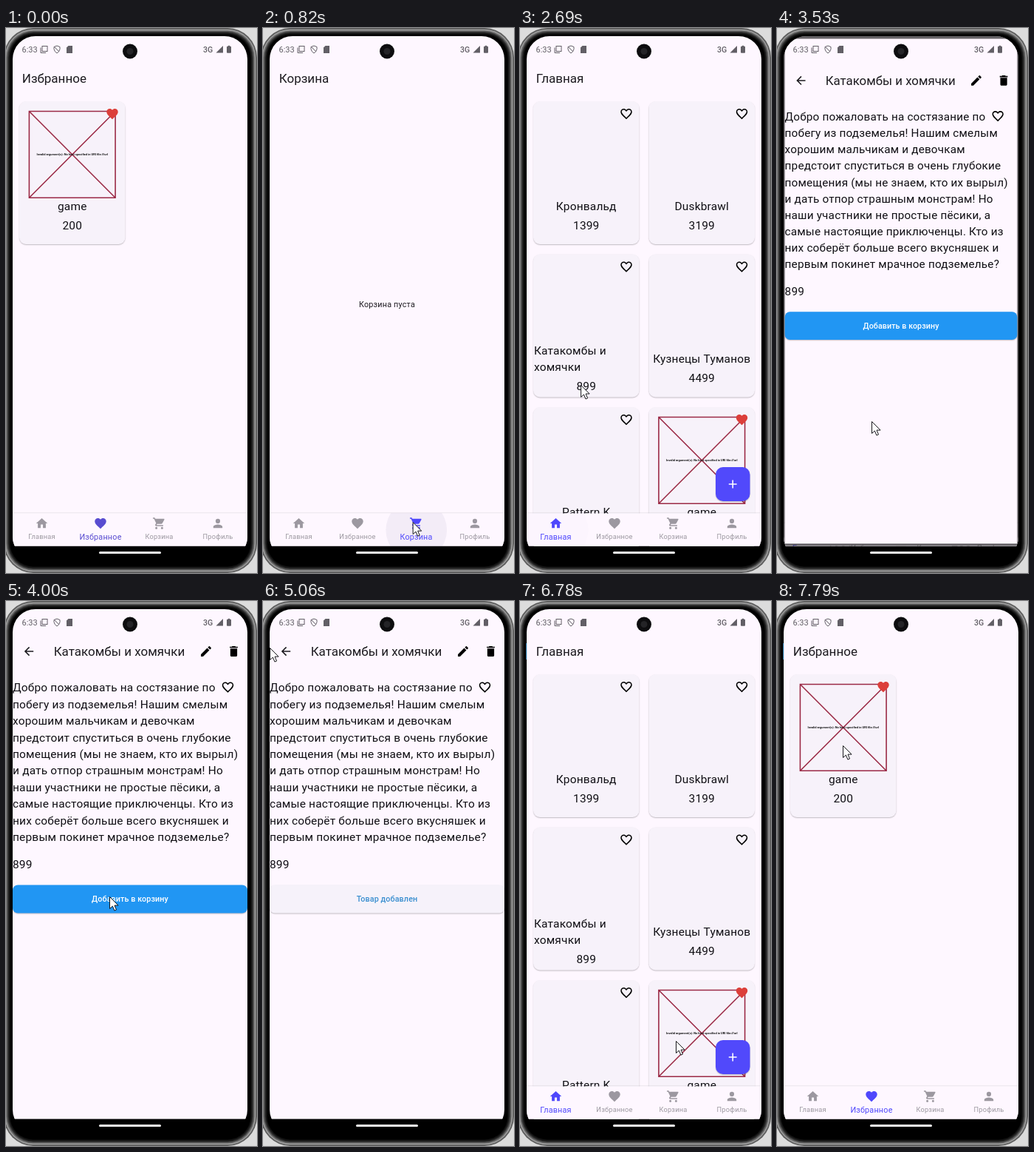
An HTML page with a canvas for the animation above (8000 ms loop, 340x736 px).

```html
<!DOCTYPE html>
<html lang="ru">
<head>
<meta charset="utf-8">
<title>Shop</title>
<style>
html, body { margin: 0; width: 100%; height: 100%; overflow: hidden; background: #000; }
canvas { display: block; width: 340px; height: 736px; }
</style>
</head>
<body>
<canvas id="stage"></canvas>
<script>
const LOOP = 8000;
const canvas = document.getElementById('stage');
const ratio = window.devicePixelRatio || 1;
canvas.width = 340 * ratio;
canvas.height = 736 * ratio;
const c = canvas.getContext('2d');

const BG = '#fef7ff', INK = '#1d1b20', CARD = '#f7f2fa', RED = '#dc3f3a', GREY = [156, 152, 160];
const CX = 168, CY = 364.5, PAGE_H = 688.7;

const HEART = new Path2D('M12 21.35l-1.45-1.32C5.4 15.36 2 12.28 2 8.5 2 5.42 4.42 3 7.5 3c1.74 0 3.41.81 4.5 2.09C13.09 3.81 14.76 3 16.5 3 19.58 3 22 5.42 22 8.5c0 3.78-3.4 6.86-8.55 11.54z');
const HOME = new Path2D('M10 20v-6h4v6h5v-8h3L12 3 2 12h3v8z');
const CART = new Path2D('M1 2v2h2l3.6 7.6-1.4 2.4c-.7 1.4.3 3 1.8 3h12v-2H7.4l1-1.9h7.2c.8 0 1.4-.4 1.8-1l3.6-6.5c.4-.7-.1-1.6-.9-1.6H5.2l-.9-2zM7 18a2 2 0 100 4 2 2 0 000-4zm10 0a2 2 0 100 4 2 2 0 000-4z');
const PERSON = new Path2D('M12 4a4 4 0 100 8 4 4 0 000-8zM12 14c-2.7 0-8 1.3-8 4v2h16v-2c0-2.7-5.3-4-8-4z');
const BACK = new Path2D('M20 11H7.83l5.59-5.59L12 4l-8 8 8 8 1.41-1.41L7.83 13H20z');
const EDIT = new Path2D('M3 17.2V21h3.8L17.8 9.9 14 6.2zM20.7 7c.4-.4.4-1 0-1.4l-2.3-2.3c-.4-.4-1-.4-1.4 0l-1.9 1.8 3.8 3.8z');
const TRASH = new Path2D('M6 19c0 1.1.9 2 2 2h8c1.1 0 2-.9 2-2V7H6zM19 4h-3.5l-1-1h-5l-1 1H5v2h14z');
const PLUS = new Path2D('M19 13h-6v6h-2v-6H5v-2h6V5h2v6h6z');
const ARROW = new Path2D('M0 0V16L3.9 12.6 6.4 18.6 9 17.5 6.5 11.6H11.6Z');

const TABS = [['Главная', HOME], ['Избранное', HEART], ['Корзина', CART], ['Профиль', PERSON]];
const SWITCHES = [[-1000, 1], [610, 2], [2300, 0], [7320, 1]];
const STORY = [
  'Добро пожаловать на состязание по',
  'побегу из подземелья! Нашим смелым',
  'хорошим мальчикам и девочкам',
  'предстоит спуститься в очень глубокие',
  'помещения (мы не знаем, кто их вырыл)',
  'и дать отпор страшным монстрам! Но',
  'наши участники не простые пёсики, а',
  'самые настоящие приключенцы. Кто из',
  'них соберёт больше всего вкусняшек и',
  'первым покинет мрачное подземелье?'
];
const GOODS = [
  { lines: ['Кронвальд'], price: '1399' },
  { lines: ['Duskbrawl'], price: '3199' },
  { lines: ['Катакомбы и', 'хомячки'], price: '899' },
  { lines: ['Кузнецы Туманов'], price: '4499' },
  { lines: ['Pattern K'], price: '1999' },
  { lines: ['game'], price: '200', liked: true }
];

// time, x, y of the pointer tip
const POINTER = [
  [150, 257, 704], [410, 203, 667], [800, 203, 667], [1300, 134, 679], [1430, 134, 679],
  [1700, 59, 683], [2380, 59, 683], [2880, 93, 387], [3130, 93, 387], [3190, 75, 397],
  [3350, 75, 397], [3530, 128, 531], [3640, 130, 531], [4000, 140, 399], [4640, 140, 399],
  [5060, 9, 63], [5150, 12, 50], [5270, 22, 60], [5480, 28, 66], [5860, 28, 66],
  [6100, 80, 185], [6370, 215, 330], [6560, 290, 520], [6780, 211, 594], [7180, 123, 661],
  [7420, 123, 661], [7780, 89, 195]
];

const clamp = v => Math.max(0, Math.min(1, v));
const mix = (a, b, p) => a + (b - a) * p;
const blend = (a, b, p) => `rgb(${a.map((v, i) => Math.round(mix(v, b[i], p)))})`;
const smooth = p => p * p * (3 - 2 * p);
// quick start with a very long tail
const zoomEase = p => p < 1 / 6 ? 14.4 * p * p : 1 - 0.6 * Math.pow((1 - p) * 1.2, 5.6);

function box(x, y, w, h, r, fill) {
  c.beginPath();
  c.roundRect(x, y, w, h, r);
  c.fillStyle = fill;
  c.fill();
}

function text(s, x, y, size, o = {}) {
  c.font = `${o.weight || 400} ${size}px Roboto, 'Noto Sans', sans-serif`;
  c.letterSpacing = (o.gap || 0) + 'px';
  c.textAlign = o.align || 'left';
  c.fillStyle = o.color || INK;
  c.fillText(s, x, y + size * 0.355);
}

const body = (s, x, y, align) => text(s, x, y, 15.46, { gap: 0.19, align, color: '#111015' });

function icon(path, x, y, color, outline) {
  c.save();
  c.translate(x, y);
  c.scale(0.773, 0.773);
  c.translate(-12, -12);
  if (outline) {
    c.clip(path);
    c.lineWidth = 4;
    c.strokeStyle = color;
    c.stroke(path);
  } else {
    c.fillStyle = color;
    c.fill(path);
  }
  c.restore();
}

function raised(x, y, w, h, r, fill) {
  c.save();
  c.shadowColor = 'rgba(0,0,0,.24)';
  c.shadowBlur = 1.5 * ratio;
  c.shadowOffsetY = ratio;
  box(x, y, w, h, r, fill);
  c.restore();
}

function ripple(t, start, x, y, radius, alpha = 0.07) {
  const p = (t - start) / 450;
  if (p <= 0 || p >= 1) return;
  c.beginPath();
  c.arc(x, y, radius * (0.3 + 0.7 * (1 - (1 - p) ** 3)), 0, 7);
  c.fillStyle = `rgba(80,72,130,${alpha * Math.min(1, 2 - 2 * p)})`;
  c.fill();
}

function brokenImage(x, y) {
  const s = 116.7;
  c.beginPath();
  c.rect(x, y, s, s);
  c.moveTo(x, y);
  c.lineTo(x + s, y + s);
  c.moveTo(x + s, y);
  c.lineTo(x, y + s);
  c.lineWidth = 1.6;
  c.strokeStyle = '#9b2a46';
  c.stroke();
  text('Invalid argument(s): No host specified in URI file:' + '///url', x + s / 2, y + s / 2, 4,
    { weight: 700, align: 'center', color: '#111' });
}

function card(item, x, y) {
  raised(x, y, 143.5, 193, 9, CARD);
  if (item.liked) brokenImage(x + 13.4, y + 13.5);
  icon(HEART, x + 126, y + 17, item.liked ? RED : '#000', !item.liked);
  const mid = x + 71.75;
  if (item.lines.length > 1) {
    item.lines.forEach((s, i) => body(s, x + 1, y + 130 + i * 22.2));
    body(item.price, mid, y + 178, 'center');
  } else {
    body(item.lines[0], mid, y + 141.5, 'center');
    body(item.price, mid, y + 167.5, 'center');
  }
}

function pageBase(title) {
  c.fillStyle = BG;
  c.fillRect(9, 11, 318, PAGE_H);
  if (title) text(title, 21.8, 68, 17);
}

function navBar(t, accent) {
  c.fillStyle = 'rgba(0,0,0,.06)';
  c.fillRect(9, 654, 318, 1.5);
  c.fillStyle = BG;
  c.fillRect(9, 655.5, 318, PAGE_H - 644.5);
  c.save();
  c.beginPath();
  c.rect(9, 655, 318, 45);
  c.clip();
  SWITCHES.forEach(([at, i]) => ripple(t, at - 40, 48.75 + i * 79.5, 678, 44));
  c.restore();
  const past = SWITCHES.filter(s => s[0] <= t);
  const now = past[past.length - 1], old = past[past.length - 2];
  const p = smooth(clamp((t - now[0]) / 200));
  TABS.forEach(([name, path], i) => {
    const on = i === now[1] ? p : old && i === old[1] ? 1 - p : 0;
    const x = 48.5 + i * 79.5, color = blend(GREY, accent, on);
    icon(path, x, 669, color);
    text(name, x, 687, mix(9.27, 10.8, on), { gap: 0.2, align: 'center', color });
  });
}

function homePage(t) {
  pageBase('Главная');
  GOODS.forEach((g, i) => card(g, 18 + (i % 2) * 156.5, 99 + (i >> 1) * 206.5));
  c.save();
  c.beginPath();
  c.roundRect(18, 305.5, 143.5, 193, 9);
  c.clip();
  ripple(t, 3310, 75, 397, 130);
  c.restore();
  raised(265, 593, 46.5, 46, 10, '#5149fb');
  icon(PLUS, 288.2, 616, '#fff');
}

function tabPage(t) {
  const tab = SWITCHES.filter(s => s[0] <= t).pop()[1];
  if (tab === 0) homePage(t);
  if (tab === 1) {
    pageBase('Избранное');
    card(GOODS[5], 18, 99);
  }
  if (tab === 2) {
    pageBase('Корзина');
    text('Корзина пуста', CX, 373, 10.8, { gap: 0.2, align: 'center' });
  }
  navBar(t, t < 600 ? [88, 76, 208] : [79, 72, 252]);
}

function detailPage(t) {
  pageBase();
  ripple(t, 5600, 31, 68, 18);
  icon(BACK, 31, 68, INK);
  text('Катакомбы и хомячки', 64.7, 68, 17);
  icon(EDIT, 271, 68, '#000');
  icon(TRASH, 308.5, 68, '#000');
  STORY.forEach((s, i) => body(s, 9, 117 + i * 22.4));
  icon(HEART, 300.5, 116.5, '#000', true);
  body('899', 9, 355.6);
  const p = clamp((t - 4600) / 200);
  raised(9, 383.5, 318, 38, 7, blend([33, 150, 243], [246, 242, 250], p));
  c.save();
  c.beginPath();
  c.rect(9, 383.5, 318, 38);
  c.clip();
  ripple(t, 4530, 140, 399, 200);
  c.restore();
  text(t > 4600 ? 'Товар добавлен' : 'Добавить в корзину', CX, 402.5, 10.8, {
    weight: 500, gap: 0.08, align: 'center',
    color: blend([255, 255, 255], [58, 143, 208], p)
  });
}

function zoomed(scale, alpha, draw, t) {
  c.save();
  c.globalAlpha = alpha;
  c.translate(CX, CY);
  c.scale(scale, scale);
  c.translate(-CX, -CY);
  draw(t);
  c.restore();
}

function screen(t) {
  const open = clamp((t - 3400) / 300), shut = clamp((t - 5985) / 300);
  const into = zoomEase(open), out = zoomEase(shut);
  if (open === 0 || shut === 1) return tabPage(t);
  if (shut > 0) {
    zoomed(1.1 - 0.1 * out, 1, tabPage, t);
    const alpha = 1 - clamp((shut - 0.0825) / 0.125);
    if (alpha) zoomed(1 - 0.1 * out, alpha, detailPage, t);
    return;
  }
  if (open < 1) {
    zoomed(1 + 0.05 * into, 1, tabPage, t);
    c.fillStyle = `rgba(0,0,0,${0.6 * clamp(open * 2.4)})`;
    c.fillRect(9, 11, 318, PAGE_H);
  }
  const alpha = clamp((open - 0.125) / 0.125);
  if (alpha) zoomed(0.85 + 0.15 * into, alpha, detailPage, t);
}

function statusBar() {
  const tone = '#625f66';
  text('6:33', 21.5, 29, 11, { color: tone });
  text('3G', 267, 29, 10.6, { weight: 500, color: tone });
  c.fillStyle = c.strokeStyle = tone;
  c.lineWidth = 1;
  c.strokeRect(49, 24.5, 7, 7);
  c.stroke(new Path2D('M47 26.5V33.5H54'));
  c.stroke(new Path2D('M65 25.5L69 24 73 25.5V28.5Q72.5 32 69 34 65.5 32 65 28.5ZM65 25L72 32'));
  c.fill(new Path2D('M84.5 24H90V34H82V26.5Z'));
  c.fill(new Path2D('M294 24V33.5H284.5Z'));
  box(299, 24.8, 6, 9, 1, tone);
  c.fillRect(300.7, 23.8, 2.6, 2);
}

function device() {
  c.fillStyle = '#dcdcdc';
  c.fillRect(0, 0, 340, 736);
  const rings = ['#5c5c5c', '#9a9a9a', '#606060', '#303030', '#141414', '#000'];
  rings.forEach((tone, i) => {
    const d = i * 1.7;
    box(-3 + d, d, 343 - 2 * d, 736 - 2 * d, 40 - d, tone);
  });
}

function camera() {
  c.beginPath();
  c.arc(CX, 31.5, 10, 0, 7);
  c.fillStyle = '#0d0d0f';
  c.fill();
  c.beginPath();
  c.arc(CX, 31.5, 4.5, 0, 7);
  c.fillStyle = '#242427';
  c.fill();
}

function pointer(t) {
  if (t < POINTER[0][0]) return;
  const i = POINTER.findIndex(k => k[0] > t);
  const b = POINTER[i < 0 ? POINTER.length - 1 : i], a = i < 0 ? b : POINTER[i - 1];
  const p = b === a ? 1 : smooth((t - a[0]) / (b[0] - a[0]));
  c.save();
  c.translate(mix(a[1], b[1], p) + 0.5, mix(a[2], b[2], p) + 0.5);
  c.fillStyle = '#fff';
  c.fill(ARROW);
  c.lineWidth = 1;
  c.strokeStyle = '#18181c';
  c.stroke(ARROW);
  c.restore();
}

function draw(t) {
  c.setTransform(ratio, 0, 0, ratio, 0, 0);
  device();
  c.save();
  c.beginPath();
  c.roundRect(9, 11, 318, 707, 31);
  c.clip();
  c.beginPath();
  c.rect(9, 11, 318, PAGE_H);
  c.clip();
  screen(t);
  statusBar();
  c.restore();
  camera();
  box(126, 707, 84, 3, 1.5, '#f4f4f4');
  if (t > 5200) {
    c.fillStyle = '#2a7aa6';
    c.fillRect(8, 57, 1.2, 22);
  }
  pointer(t);
}

const begin = performance.now();
function tick() {
  draw((performance.now() - begin) % LOOP);
  requestAnimationFrame(tick);
}
tick();
</script>
</body>
</html>
```
